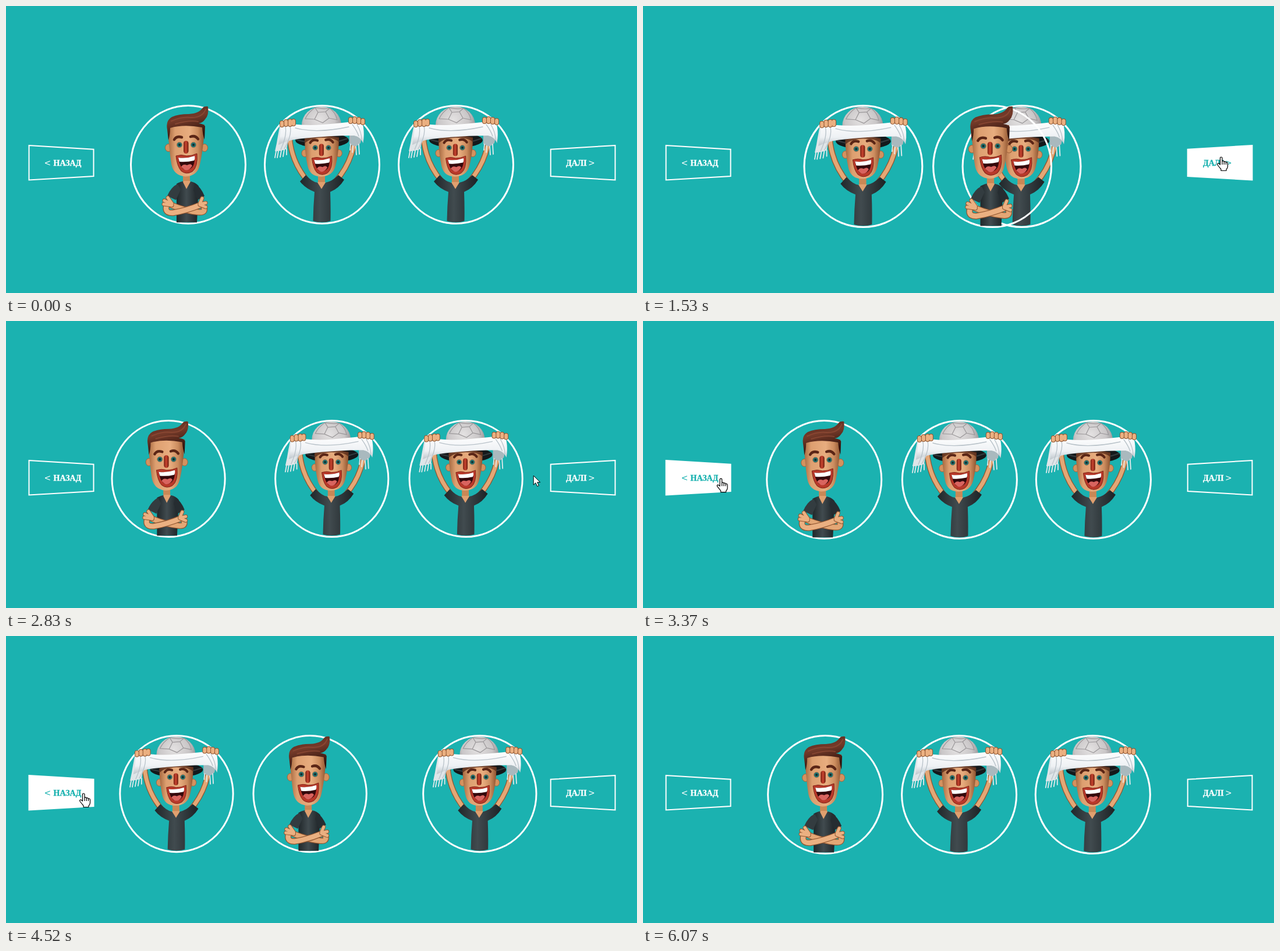
Animation, 1084 px wide and 494 px high, one loop 6150 ms. Source, as an HTML page:

```html
<!DOCTYPE html>
<html lang="uk">
<head>
<meta charset="utf-8">
<title>Карусель</title>
<style>
  html, body { margin: 0; width: 100%; height: 100%; overflow: hidden; background: #1bb2b0; }
  svg { display: block; width: 100%; height: 100%; }
  text { font: bold 14px "Liberation Serif", "Times New Roman", serif; stroke-width: .35; }
  .mark { font: 14px "DejaVu Serif", serif; stroke: none; }
  .ring { fill: none; stroke: #fff; stroke-width: 3; }
  .line { fill: none; stroke-linecap: round; stroke-linejoin: round; }
</style>
</head>
<body>
<svg viewBox="0 0 1084 494" preserveAspectRatio="none">
  <defs>
    <linearGradient id="skin">
      <stop offset="0" stop-color="#a5683f"/><stop offset=".2" stop-color="#dd9f70"/>
      <stop offset=".6" stop-color="#e8ad7f"/><stop offset=".82" stop-color="#cb8c5e"/><stop offset="1" stop-color="#8d532f"/>
    </linearGradient>
    <linearGradient id="shirt">
      <stop offset="0" stop-color="#20272a"/><stop offset=".45" stop-color="#414b4f"/><stop offset="1" stop-color="#1c2225"/>
    </linearGradient>
    <linearGradient id="hair" x2=".3" y2="1">
      <stop offset="0" stop-color="#54241a"/><stop offset=".45" stop-color="#743a29"/><stop offset="1" stop-color="#2b100b"/>
    </linearGradient>
    <linearGradient id="nose">
      <stop offset="0" stop-color="#7c2415"/><stop offset=".5" stop-color="#c9442f"/><stop offset="1" stop-color="#6b1d0e"/>
    </linearGradient>
    <radialGradient id="ball" cx=".45" cy=".35" r=".65">
      <stop offset="0" stop-color="#e4e2e2"/><stop offset=".6" stop-color="#c9c6c7"/><stop offset="1" stop-color="#807f82"/>
    </radialGradient>
    <linearGradient id="cloth" x2="0" y2="1">
      <stop offset="0" stop-color="#fff"/><stop offset=".65" stop-color="#eef1f4"/><stop offset="1" stop-color="#bdc5cb"/>
    </linearGradient>
    <clipPath id="crop"><path d="M-110-10H110V202.500H-110Z"/></clipPath>

    <g id="features">
      <g class="line" stroke="#5b2616" stroke-width="4.500">
        <path d="M-24 60Q-20 53-11 56"/><path d="M4 55Q12 52 17 59"/>
      </g>
      <g fill="#23726f" stroke="#b07a55"><circle cx="-15" cy="69" r="4.700"/><circle cx="9" cy="69" r="4.700"/></g>
      <g fill="#0f2a2c"><circle cx="-15" cy="69" r="2"/><circle cx="9" cy="69" r="2"/></g>
      <rect x="-8" y="62" width="8.500" height="22" rx="4.200" fill="url(#nose)"/>
      <path d="M-21 88Q-12 85-3 88Q7 88 15 84Q17 107 7 115Q-3 121-12 114Q-19 106-21 88Z" fill="#b9392a" stroke="#7f2317"/>
      <path d="M-17 91Q-3 93 11 88Q12 105 4 110Q-4 115-10 109Q-15 104-17 91Z" fill="#35090c"/>
      <path d="M-17 91Q-3 93 11 88Q12 93 10 96Q-2 99-15 98Z" fill="#fff"/>
      <path d="M-12 107Q-9 101-2 104Q5 100 7 105Q1 115-6 112Z" fill="#d9645f"/>
    </g>
    <g id="ears" fill="#d4925f" stroke="#a0623b">
      <ellipse cx="-34" cy="74" rx="5.500" ry="6.500"/><ellipse cx="28" cy="74" rx="5.500" ry="6.500"/>
    </g>

    <g id="man">
      <path d="M-9 118H3V139L-3 144L-9 139Z" fill="#c98856"/>
      <path d="M-20 136Q-10 131-8 132L-3 143L4 132Q12 133 18 140L15 203H-20Z" fill="url(#shirt)"/>
      <path d="M-9 133L-3 145L4 132L2 131H-8Z" fill="#e0a06f"/>
      <path d="M-18 136Q-30 142-36 157L-21 164L-13 146Z" fill="#333c40"/>
      <path d="M12 136Q22 142 28 157L16 164L9 147Z" fill="#262d31"/>
      <g class="line">
        <path d="M27 177Q30 186 18 185Q-4 183-28 173" stroke="#8f5530" stroke-width="11"/>
        <path d="M27 177Q30 186 18 185Q-4 183-28 173" stroke="#e4a775" stroke-width="8.500"/>
        <path d="M-34 166Q-45 187-26 186Q-2 182 22 172" stroke="#8f5530" stroke-width="11"/>
        <path d="M-34 166Q-45 187-26 186Q-2 182 22 172" stroke="#ebb081" stroke-width="8.500"/>
        <g stroke="#8f5530" stroke-width="7"><path d="M-28 173L-42 171M-28 171L-41 165M-28 170L-35 160"/><path d="M20 172L30 176M20 171L30 169M20 170L24 161"/></g>
        <g stroke="#ebb081" stroke-width="5"><path d="M-28 173L-42 171M-28 171L-41 165M-28 170L-35 160"/><path d="M20 172L30 176M20 171L30 169M20 170L24 161"/></g>
      </g>
      <use href="#ears"/>
      <path d="M-35 36Q-34 70-29 102Q-25 122-5 123.500Q16 123 20 103Q27 72 28 34Z" fill="url(#skin)"/>
      <use href="#features"/>
      <path d="M-36 43Q-39 27-28 21Q-17 16 1 16Q19 15 25 5Q28 2 34 3Q36 18 29 25Q25 31 18 32Q27 33 29 37L28 60Q25 52 24 39Q-8 33-31 40Q-31 52-34 61Z" fill="url(#hair)"/>
      <path d="M-29 28Q-10 20 4 22Q24 23 30 8M-22 33Q3 26 17 29" class="line" stroke="#985039" stroke-width="2" opacity=".6"/>
    </g>

    <g id="fan">
      <ellipse cx="-1" cy="35" rx="34" ry="32" fill="url(#ball)"/>
      <path d="M-7 13L6 12L12 23L1 31L-13 25ZM-7 13L-12 5M6 12L13 6M12 23L26 26M-13 25L-29 24M-29 24Q-23 12-12 5Q1 8 13 6Q23 13 26 26" class="line" stroke="#9a9799" stroke-width="1.200"/>
      <ellipse cx="0" cy="61" rx="46" ry="13" fill="#14191b"/>
      <path d="M-44 60Q0 74 44 58" class="line" stroke="#343c3f" stroke-width="2"/>
      <g class="line">
        <path d="M-56 36Q-59 91-25 131M59 32Q58 93 23 132" stroke="#8f5530" stroke-width="9.500"/>
        <path d="M-56 36Q-59 91-25 131M59 32Q58 93 23 132" stroke="#e4a775" stroke-width="7"/>
      </g>
      <path d="M-7 118H5V140L-1 145L-7 139Z" fill="#c98856"/>
      <path d="M-28 121Q-17 133-8 134L-1 144L6 134Q17 132 28 121L38 129Q29 144 14 150Q15 176 14.500 200Q0 205-15.500 200Q-15 174-13 150Q-29 144-38 132Z" fill="url(#shirt)"/>
      <path d="M-8 133L-1 145L6 133Z" fill="#e0a06f"/>
      <g transform="translate(1.500 5.500) scale(.95)">
        <use href="#ears" x="1" y="8"/>
        <path d="M-33 56Q-33 81-28 104Q-24 124-4 124.500Q18 124 23 104Q29 80 29 54Q-2 47-33 56Z" fill="url(#skin)"/>
        <path d="M-33 54Q-2 46 29 53V62Q22 54-2 54Q-24 55-33 64Z" fill="#532717" opacity=".75"/>
        <use href="#features" x="1" y="3"/>
      </g>
      <path d="M-72 34Q-76 53-78 66L-81 80Q-70 80-61 76Q-60 64-53 56L-50 36Z" fill="#dfe5e8"/>
      <path d="M47 52L70 48L66 66L58 72L47 68Z" fill="#a9b9be"/>
      <path d="M-71 31Q-30 37 2 34Q40 31 68 27Q74 45 70.500 66Q66 55 55 53Q8 53-42 59Q-59 61-75 69Q-71 48-71 31Z" fill="url(#cloth)"/>
      <path d="M-63 38Q-60 53-71 77M-55 37Q-51 52-65 76M60 34Q68 48 68 60M52 34Q60 45 63 54M-46 40Q-10 50 46 38" class="line" stroke="#b7c1c8" stroke-width="1.300"/>
      <path d="M-79 80L-81 91M-75 80L-77 91M-70 79L-72 90M-65 77L-67 89M-61 76L-61 86M49 68L48 78M53 71L52 82M58 72L59 86M63 68L64 85" class="line" stroke="#e3eaec" stroke-width="1.800"/>
      <g class="line">
        <path d="M-69 31V35M-62 29V34M-55 28V34M-49 28V33M49 25V29M56 24V29M63 25V30M70 27V31" stroke="#8f5530" stroke-width="8"/>
        <path d="M-69 31V35M-62 29V34M-55 28V34M-49 28V33M49 25V29M56 24V29M63 25V30M70 27V31" stroke="#ebb081" stroke-width="6"/>
      </g>
    </g>
  </defs>

  <g id="items"></g>

  <g class="btn">
    <path d="M39.500 240L150.500 246.800V293L39.500 299.500Z" stroke="#fff" stroke-width="2" fill="#fff"/>
    <text y="275"><tspan class="mark" x="65.500">&lt;</tspan><tspan x="81.500">НАЗАД</tspan></text>
  </g>
  <g class="btn">
    <path d="M1046.500 240L935.700 246.800V293L1046.500 299.500Z" stroke="#fff" stroke-width="2" fill="#fff"/>
    <text y="275"><tspan x="962">ДАЛІ</tspan><tspan class="mark" x="1000">&gt;</tspan></text>
  </g>

  <g id="cursor" stroke="#000" stroke-linejoin="round">
    <path id="arrow" d="M0 0V16L3.700 12.500L6.500 18.500L9.200 17.300L6.500 11.500H11.500Z" fill="#fff"/>
    <path id="hand" d="M-1.500 13V2Q-1.500 0 .3 0Q2 0 2 2V8Q2 6.500 3.800 6.700Q5.300 7 5.300 8.500Q5.600 7.300 7 7.600Q8.500 8 8.500 9.500Q9 8.600 10.300 9Q11.500 9.500 11.500 11V16Q11 20 9 21V23.500H0V21Q-3 17.500-6 13.500Q-7 11.500-5.300 11Q-4 10.600-1.500 13ZM2 8V13M5.300 8.500V13M8.500 9.500V13" fill="#fff" stroke-width="1.200"/>
  </g>
</svg>

<script>
  const LOOP = 6150, FIRST = 313, GAP = 230, TOP = 170;
  const TEAL = '#1bb2b0';
  const RATE = 0.5 * Math.PI / 180;               // spring phase per ms
  const CLICKS = [805, 1447, 2334, 3464, 4040, 4700];
  const SHIFTS = [0, 1, 2, 3, 2, 1, 0];
  const HOVERS = [[3270, 5300], [640, 2740]];     // back, next
  const PATH = [                                  // time, x, y of the pointer tip
    [210, 1030, 472], [360, 1020, 388], [510, 1004, 322], [750, 993, 260], [2680, 993, 260],
    [2830, 908, 266], [3000, 610, 282], [3270, 140, 273], [3380, 133, 271], [LOOP, 133, 271]
  ];

  const $ = id => document.getElementById(id);
  const box = $('items');
  const items = ['man', 'fan', 'fan'].map(name => {
    const g = document.createElementNS('http://www.w3.org/2000/svg', 'g');
    g.innerHTML = `<ellipse class="ring" cy="103" rx="98.500" ry="101.500"/><g clip-path="url(#crop)"><use href="#${name}"/></g>`;
    return box.appendChild(g);
  });
  const buttons = [...document.querySelectorAll('.btn')];

  const clamp = v => Math.max(0, Math.min(1, v));
  const slot = (item, step) => (item + SHIFTS[step]) % 3;

  function spring(dt) {
    const a = dt * RATE, k = 0.577;
    return 1 - Math.exp(-k * a) * (Math.cos(a) + k * Math.sin(a));
  }

  // Swell and dip in size that goes with each move.
  function kick(dt) {
    if (dt <= 0) return 0;
    const a = dt * RATE;
    return 0.05 * Math.sin(0.89 * a) * Math.exp(-((a / 4.54) ** 4));
  }

  // Each move starts wherever the previous one had got to.
  function place(item, step, t) {
    const to = FIRST + GAP * slot(item, step);
    if (!step) return to;
    const start = CLICKS[step - 1];
    const from = place(item, step - 1, start);
    return from + (to - from) * spring(t - start);
  }

  function pointer(t) {
    const i = Math.max(1, PATH.findIndex(p => p[0] > t));
    const [t0, x0, y0] = PATH[i - 1], [t1, x1, y1] = PATH[i];
    const k = clamp((t - t0) / (t1 - t0));
    return [x0 + (x1 - x0) * k, y0 + (y1 - y0) * k];
  }

  let stacked = -1;

  function draw(t) {
    const step = CLICKS.filter(c => c <= t).length;
    const scale = 1 + CLICKS.reduce((sum, c) => sum + kick(t - c), 0);
    if (step !== stacked) {
      [0, 1, 2].sort((a, b) => slot(a, step) - slot(b, step)).forEach(i => box.appendChild(items[i]));
      stacked = step;
    }
    items.forEach((g, i) => {
      g.setAttribute('transform', `translate(${place(i, step, t).toFixed(2)} ${TOP}) scale(${scale.toFixed(4)})`);
    });

    let over = false;
    buttons.forEach((b, i) => {
      const [on, off] = HOVERS[i];
      const fill = clamp((t - on) / 80) - clamp((t - off) / 80);
      const ink = fill > 0.5 ? TEAL : '#fff';
      over = over || (t >= on && t < off);
      b.firstElementChild.setAttribute('fill-opacity', fill);
      b.lastElementChild.setAttribute('fill', ink);
      b.lastElementChild.setAttribute('stroke', ink);
    });

    const [x, y] = pointer(t);
    $('cursor').setAttribute('transform', `translate(${x.toFixed(1)} ${y.toFixed(1)})`);
    $('cursor').style.display = t >= 210 && t < 5300 ? '' : 'none';
    $('arrow').style.display = over ? 'none' : '';
    $('hand').style.display = over ? '' : 'none';
  }

  const begin = performance.now();
  function tick() {
    draw((performance.now() - begin) % LOOP);
    requestAnimationFrame(tick);
  }
  tick();
</script>
</body>
</html>
```
